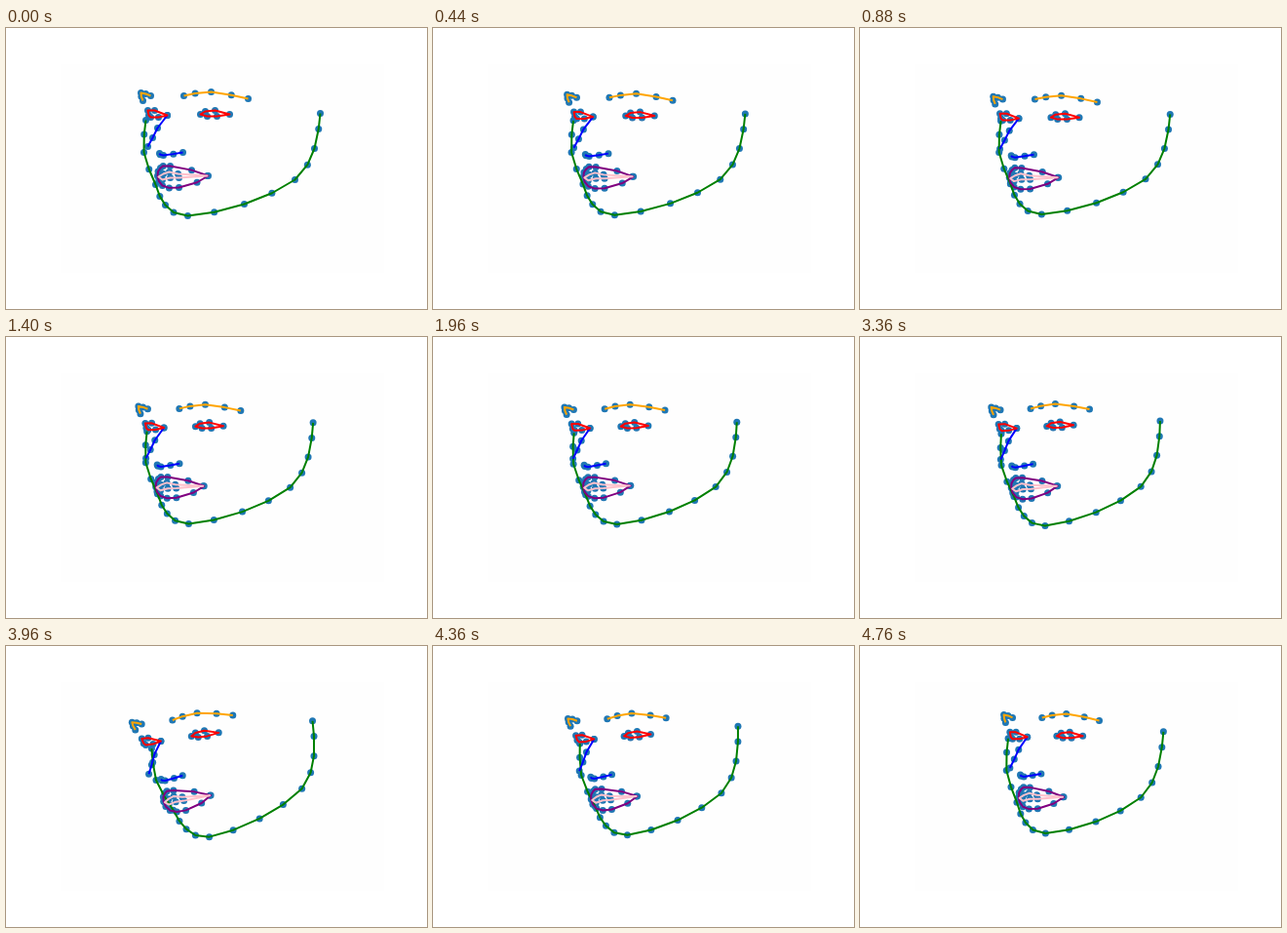
These frames come from a looping animation (432 px wide and 288 px high, 4800 ms). An HTML page with a canvas:

```html
<!DOCTYPE html>
<html lang="en">
<head>
<meta charset="utf-8">
<title>Face landmarks</title>
<style>
  html, body { margin: 0; width: 100%; height: 100%; overflow: hidden; background: #fff; }
  canvas { display: block; }
</style>
</head>
<body>
<canvas id="stage" width="432" height="288"></canvas>
<script>
const LOOP = 4800, STEP = 40;

// Head poses: shift of the head, extra shift of the face over the jaw,
// turn (narrows the head), nod (flattens it) and tilt.
const poses = [
  { time: 0, shift: [0, 0], face: [0, 0], turn: 0, nod: 0, tilt: 0 },
  { time: 880, shift: [-0.6, 0], face: [-3, 2.3], turn: 3, nod: 1.5, tilt: 0 },
  { time: 1960, shift: [-1.3, 1.4], face: [-4, 0.5], turn: 6.5, nod: 2.2, tilt: 0.2 },
  { time: 2600, shift: [4.6, 2.6], face: [-8.8, 0], turn: 5.6, nod: 2, tilt: 0.75 },
  { time: 3360, shift: [-1.7, 2], face: [-4, 0], turn: 8.7, nod: 1.5, tilt: 0.3 },
  { time: 3960, shift: [8, 3], face: [-10, 0], turn: 7, nod: 1.5, tilt: 1 },
  { time: 4760, shift: [2.3, 0], face: [0, 3.5], turn: 11, nod: 0.5, tilt: 0 },
];

const mix = (a, b, k) => a + (b - a) * k;
const mixPair = (a, b, k) => a.map((v, i) => mix(v, b[i], k));

// Adds a spline midpoint between neighbouring points.
function refine(points, closed = false) {
  const n = points.length;
  const at = i => points[closed ? (i + n) % n : Math.min(Math.max(i, 0), n - 1)];
  const middle = i => [0, 1].map(axis =>
    (9 * (at(i)[axis] + at(i + 1)[axis]) - at(i - 1)[axis] - at(i + 2)[axis]) / 16);
  const dense = points.flatMap((p, i) => [p, middle(i)]);
  return closed ? dense : dense.slice(0, -1);
}

const features = [
  { color: 'green', jaw: true, points: refine([[143, 94], [141, 127], [153, 160], [163, 181],
    [186, 192], [244, 180], [296, 155], [316, 123], [322, 87]]) },
  { color: 'orange', points: refine([[140, 74], [138, 66], [148, 69]]) },
  { color: 'orange', points: refine([[182, 69], [210, 65], [248, 72]]) },
  { color: 'blue', points: [[165, 89], [155, 102], [150, 112], [145, 121]] },
  { color: 'blue', points: refine([[157, 128], [161, 130], [181, 127]]) },
  { color: 'red', closed: true,
    points: [[146, 89], [145, 84], [152, 84], [165, 89], [156, 91], [148, 91]] },
  { color: 'red', closed: true,
    points: [[199, 88], [204, 85], [214, 84], [229, 88], [216, 90], [206, 90]] },
  { color: 'purple', closed: true, points: refine([[155, 151], [158, 143], [168, 141],
    [207, 151], [177, 163], [160, 161]], true) },
  { color: 'pink', closed: true, points: [[156, 152], [161, 149], [167, 147], [176, 149],
    [206, 151], [177, 153], [168, 153], [160, 155]] },
];

function poseAt(time) {
  const next = poses.findIndex(p => p.time >= time && p.time > 0);
  const a = poses[next - 1], b = poses[next];
  const k = (time - a.time) / (b.time - a.time);
  return {
    shift: mixPair(a.shift, b.shift, k),
    face: mixPair(a.face, b.face, k),
    turn: mix(a.turn, b.turn, k),
    nod: mix(a.nod, b.nod, k),
    tilt: mix(a.tilt, b.tilt, k),
  };
}

function place([x, y], jaw, { shift, face, turn, nod, tilt }) {
  const u = (x - 200) / 100, v = (y - 125) / 65;
  const [faceX, faceY] = jaw ? [0, 0] : face;
  return [
    x + 0.5 + shift[0] + faceX - turn * u + 12.7 * tilt * v,
    y + 0.5 + shift[1] + faceY - nod * v - 12 * tilt * u,
  ];
}

const ctx = document.getElementById('stage').getContext('2d');
ctx.lineWidth = 2;
ctx.lineJoin = 'round';

function draw(time) {
  const pose = poseAt(time);
  const placed = features.map(f => f.points.map(p => place(p, f.jaw, pose)));

  ctx.fillStyle = '#fff';
  ctx.fillRect(0, 0, 432, 288);
  ctx.fillStyle = '#fefefe';
  ctx.fillRect(56, 37, 332, 214);

  ctx.fillStyle = '#1f77b4';
  for (const [x, y] of placed.flat()) {
    ctx.beginPath();
    ctx.arc(x, y, 3.5, 0, 2 * Math.PI);
    ctx.fill();
  }

  features.forEach(({ color, closed }, i) => {
    ctx.strokeStyle = color;
    ctx.beginPath();
    for (const [x, y] of placed[i]) ctx.lineTo(x, y);
    if (closed) ctx.closePath();
    ctx.stroke();
  });
}

function tick() {
  draw(Math.floor(performance.now() % LOOP / STEP) * STEP);
  requestAnimationFrame(tick);
}
tick();
</script>
</body>
</html>
```
